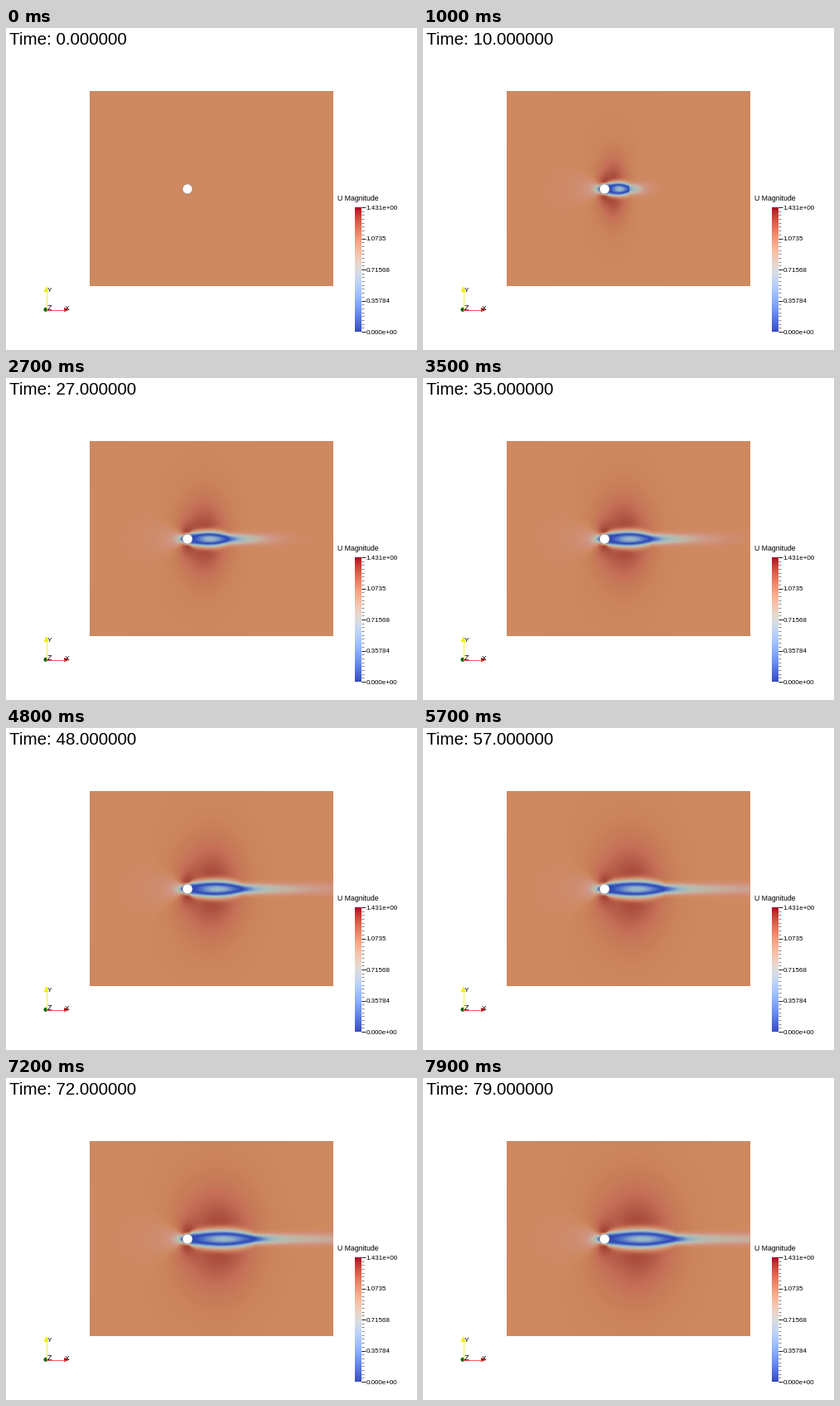
Write a matplotlib script that moves like this. It is 496 by 388 pixels and loops after 8000 ms.

```python
import numpy as np
import matplotlib.pyplot as plt
from matplotlib.animation import FuncAnimation
from matplotlib.colors import LinearSegmentedColormap

W, H, DPI = 496, 388, 100
FRAMES, STEP = 80, 100
LEFT, RIGHT, TOP, BOTTOM = 101, 395, 76, 311
CX, CY, R = 219, 194, 6
VMAX = 1.431

STOPS = [
    (0.00, (45, 70, 180)), (0.20, (82, 115, 198)), (0.42, (150, 180, 200)),
    (0.60, (178, 190, 178)), (0.75, (197, 178, 160)), (0.88, (207, 150, 133)),
    (0.965, (208, 141, 110)), (1.00, (206, 137, 96)), (1.04, (200, 127, 88)),
    (1.09, (198, 112, 89)), (1.20, (172, 80, 63)), (VMAX, (150, 38, 35)),
]
speed_map = LinearSegmentedColormap.from_list(
    "speed", [(v / VMAX, np.array(c) / 255) for v, c in STOPS], N=512)

X, Y = np.meshgrid(np.arange(LEFT, RIGHT) + 0.5 - CX,
                   np.arange(TOP, BOTTOM) + 0.5 - CY)
R2 = np.maximum(X**2 + Y**2, R**2)
COS2, SIN2 = (X**2 - Y**2) / R2, 2 * X * Y / R2
AFT = np.maximum(X, 0)


def sigmoid(z):
    return 1 / (1 + np.exp(-np.clip(z, -40, 40)))


def speed(t):
    """Velocity magnitude of the growing wake behind the cylinder."""
    if t == 0:
        return np.ones_like(X)
    length = 9.6 * np.sqrt(t)          # recirculation bubble
    front = 5 + 3.3 * t                # start-up front moving downstream
    past = np.maximum(X - length, 0)

    # flow around the body: stagnation ahead, mild speed-up at the sides
    strength = 36 + 0.5 * length
    base = strength / (R2 + strength - R**2)
    around = base * np.where(COS2 < 0, 0.4 * COS2, COS2 * (X < 0))
    v = np.where(X < 0, 0.4 * base * SIN2, 0)

    # fast lobes above and below the bubble
    rho = np.hypot((X - 0.5 * length + 3) / (0.47 * length),
                   Y / (19 + 0.45 * length))
    outer = 1 - around + 0.3 * (1 - np.exp(-t / 3)) * np.exp(-1.2 * rho**1.5)
    outer -= 0.08 * np.exp(-t / 25 - ((X - front - 6) / 15) ** 2 - (Y / 10) ** 2)
    outer *= 1 - np.exp(-(np.sqrt(R2) - R + 0.3) / 1.2)

    # velocity on the axis: reversed in the bubble, recovering after it
    inside = np.clip((X - R) / max(length - R, 1), 0, 1)
    axis = -0.45 * min(1, t / 8) * np.sin(np.pi * inside) ** 1.3
    axis += 0.76 * (1 - np.exp(-past / 24))
    axis += (1 - axis) * sigmoid((X - front) / (4 + 0.5 * t)) * (past > 0)

    bulge = np.sin(np.pi * np.clip(X / length, 0, 1)) ** 0.8
    width = 5.5 + 1.5 * np.exp(-AFT / 20) + 0.06 * length * bulge
    width += 0.012 * past
    power = 2.2 + 2 * np.exp(-AFT / 10)
    wake = np.exp(-(np.abs(Y) / width) ** power) * np.clip(X / R, 0, 1)

    u = outer - (outer - axis) * wake
    return np.clip(np.hypot(u, v * (1 - wake)), 0, VMAX)


fig = plt.figure(figsize=(W / DPI, H / DPI), dpi=DPI, facecolor="white")
ax = fig.add_axes([0, 0, 1, 1])


def label(x, y, text, px, **kw):
    return ax.text(x, y, text, fontsize=px * 72 / DPI, color="black",
                   family="Liberation Sans", **kw)


def line(xs, ys, color, px=1):
    ax.plot(xs, ys, color=color, lw=px * 72 / DPI, solid_capstyle="butt")


field = ax.imshow(speed(0), cmap=speed_map, vmin=0, vmax=VMAX,
                  extent=(LEFT, RIGHT, BOTTOM, TOP), interpolation="nearest")
ax.add_patch(plt.Circle((CX, CY), R, fc="white", ec="#8a7468", lw=0.4, zorder=3))
clock = label(4.5, 20, "", 20.6)

# colour legend
BAR_TOP, BAR_BOTTOM = 216, 366
ax.imshow(np.linspace(1, 0, 150)[:, None], cmap="coolwarm", aspect="auto",
          extent=(421, 429, BAR_BOTTOM, BAR_TOP), interpolation="nearest")
label(400.5, 208, "U Magnitude", 8.8)
for y in np.linspace(BAR_TOP, BAR_BOTTOM, 33):
    line([429, 432], [y, y], "#555555", 0.7)
names = ["1.431e+00", "1.0735", "0.71568", "0.35784", "0.000e+00"]
for y, name in zip(np.linspace(BAR_TOP, BAR_BOTTOM, 5), names):
    line([429, 434], [y, y], "black", 0.8)
    label(434.5, y + 2.8, name, 8)

# orientation axes
line([48.5, 48.5], [339, 317], "#f0f040")
line([48, 71], [339.5, 339.5], "#f05a5a")
ax.add_patch(plt.Polygon([(48.5, 311), (45.5, 318), (51.5, 318)], fc="#f0f000"))
ax.add_patch(plt.Polygon([(76.5, 339.5), (70, 336.8), (70, 342.2)], fc="#c81e1e"))
ax.add_patch(plt.Circle((48, 339.3), 2.5, fc="#006400"))
label(49.5, 318, "Y", 8.5)
label(70.5, 339.5, "X", 8.5)
label(49.5, 339.5, "Z", 9)

ax.set(xlim=(0, W), ylim=(H, 0), aspect="auto")
ax.axis("off")


def draw(n):
    field.set_data(speed(n))
    clock.set_text(f"Time: {n:.6f}")
    return field, clock


anim = FuncAnimation(fig, draw, frames=FRAMES, interval=STEP, repeat=True,
                     repeat_delay=0)
plt.show()
```
